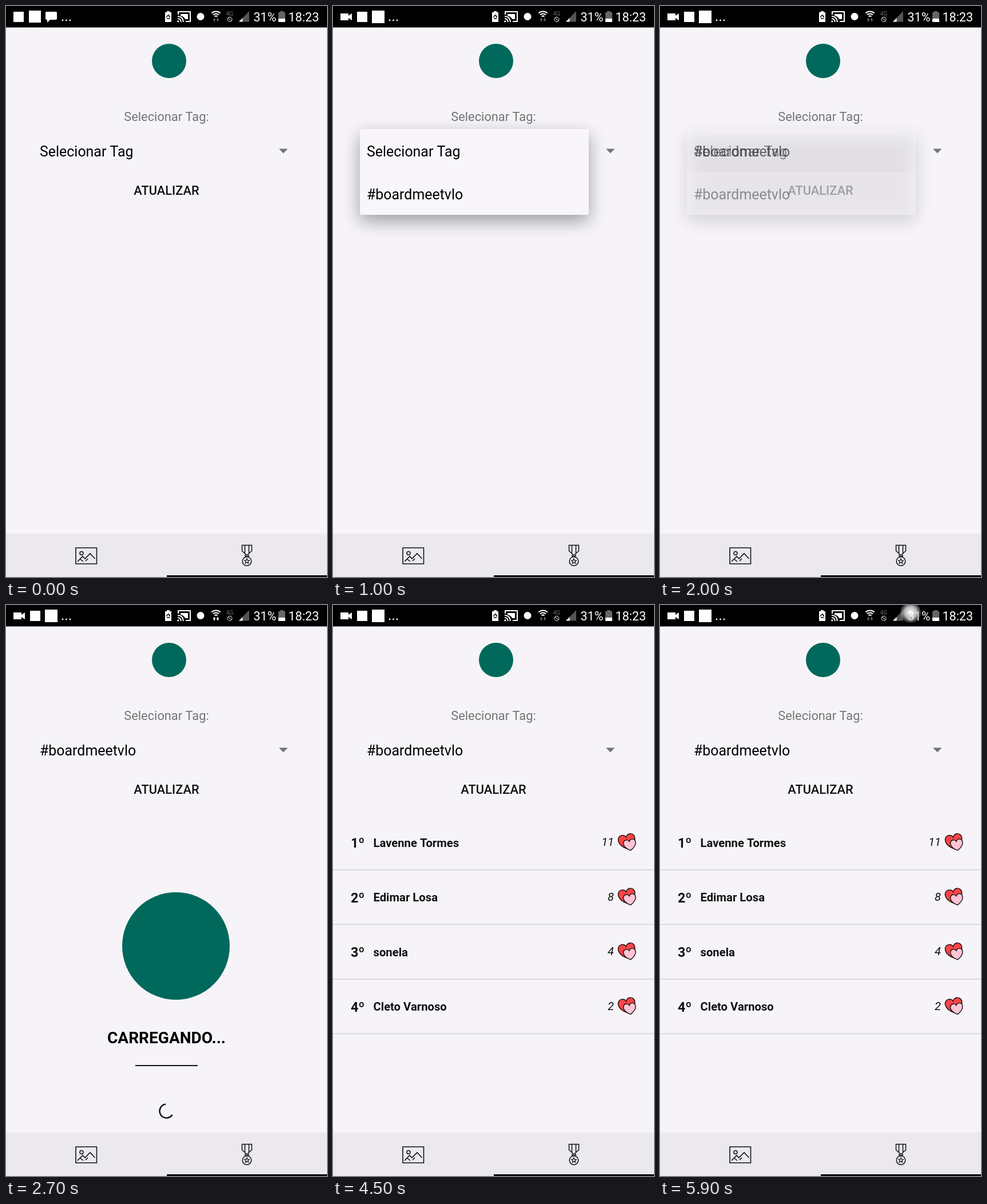
An HTML page with a canvas that plays this animation: 561x998 px, repeating every 6000 ms.

```html
<!DOCTYPE html>
<html lang="pt">
<head>
<meta charset="utf-8">
<style>
html, body { margin: 0; width: 561px; height: 998px; overflow: hidden; background: #f6f4f8; }
canvas { display: block; }
</style>
</head>
<body>
<canvas id="stage" width="561" height="998"></canvas>
<script>
const ctx = document.getElementById('stage').getContext('2d');
const LOOP = 6000, STEP = 100;
const BG = '#f6f4f8', INK = '#111', GREEN = '#00695c', GREY = '#757575';
const PROMPT = 'Selecionar Tag', TAG = '#boardmeetvlo';
const RANKING = [['Lavenne Tormes', 11], ['Edimar Losa', 8], ['sonela', 4], ['Cleto Varnoso', 2]];

function text(str, x, y, size, { color = INK, weight = 400, align = 'left', style = 'normal' } = {}) {
  ctx.font = `${style} ${weight} ${size}px Roboto, sans-serif`;
  ctx.textAlign = align;
  ctx.fillStyle = color;
  ctx.fillText(str, x, y);
}

function rect(x, y, w, h, color) {
  ctx.fillStyle = color;
  ctx.fillRect(x, y, w, h);
}

function disc(x, y, r, color) {
  ctx.beginPath();
  ctx.arc(x, y, r, 0, 2 * Math.PI);
  ctx.fillStyle = color;
  ctx.fill();
}

function fill(path, color) {
  ctx.fillStyle = color;
  ctx.fill(new Path2D(path));
}

function stroke(path, color, width) {
  ctx.strokeStyle = color;
  ctx.lineWidth = width;
  ctx.stroke(new Path2D(path));
}

function layer(alpha, draw) {
  ctx.save();
  ctx.globalAlpha = alpha;
  draw();
  ctx.restore();
}

function drawNotifications(recording) {
  if (recording) {
    fill('M13 13h14v4l6-4v12l-6-4v4h-14z', '#fff');
    rect(42, 10, 18, 18, '#fff');
    rect(68, 8, 22, 22, '#fff');
  } else {
    rect(13, 10, 18, 18, '#fff');
    rect(40, 8, 21, 21, '#fff');
    fill('M71 10h16q2 0 2 2v10q0 2-2 2h-10l-5 5v-5h-1q-2 0-2-2v-10q0-2 2-2z', '#fff');
  }
  for (const x of [99, 105.5, 112]) disc(x, 25, 1.4, '#fff');
}

function drawWifi(active) {
  ctx.strokeStyle = '#fff';
  ctx.lineWidth = 2;
  for (const r of [3.5, 7.5, 11.5]) {
    ctx.beginPath();
    ctx.arc(367, 21, r, -2.3, -0.84);
    ctx.stroke();
  }
  const color = active ? '#fff' : '#666';
  fill('M361.5 24l2.5-3 2.5 3h-1.5v3h-2v-3z', color);
  fill('M367.5 24l2.5 3 2.5-3h-1.5v-3h-2v3z', color);
}

function drawStatusBar(t) {
  rect(0, 0, 561, 37.5, '#000');
  drawNotifications(t >= 300);
  fill('M278 11h3v-2h5v2h3v17h-11z', '#fff');
  stroke('M283.5 15l3 5M286 22h-5M280.5 20l2-4', '#000', 1.6);
  stroke('M301 15v-5h21v17h-8', '#fff', 2);
  fill('M305 14h13v9h-5q-2-5-8-6z', '#fff');
  stroke('M300 18q9 0 10 10M300 22q5 0 6 6', '#fff', 2);
  disc(300.8, 26.8, 1.6, '#fff');
  disc(340, 18.5, 6.5, '#fff');
  drawWifi(t >= 2300 && t < 3500);
  text('4G', 391, 17, 10.5, { color: '#666', align: 'center' });
  ctx.beginPath();
  ctx.arc(391, 23.5, 4, 0, 7);
  ctx.strokeStyle = '#aaa';
  ctx.lineWidth = 1.3;
  ctx.stroke();
  stroke('M388 21l6 5', '#aaa', 1.3);
  fill('M425 9v18.5h-18z', '#555');
  fill('M413.5 21v6.5h-6.5z', '#fff');
  text('31%', 432.5, 26.7, 21.5, { color: '#fff' });
  fill('M476 11h3v-2h6v2h3v17h-12z', '#666');
  rect(476, 22, 12, 6, '#fff');
  text('18:23', 493.5, 26.7, 21.5, { color: '#fff' });
}

function drawNav() {
  rect(0, 922, 561, 76, '#ebe9ed');
  rect(281, 995, 280, 3, '#000');
  stroke('M122 947h36.5v28h-36.5zM125 971l9-9 4 4 9-9 8.5 9M130 967l5 4M139 970l4-4', INK, 1.6);
  stroke('M135 956.5a3 3 0 1 1-6 0a3 3 0 1 1 6 0z', INK, 1.5);
  stroke('M412.5 942.5h17v10l-8.5 7.5-8.5-7.5zM417.5 943v13M424.5 943v13M418 959v3h6v-3', INK, 1.5);
  ctx.beginPath();
  ctx.arc(421, 970.5, 7.8, 0, 7);
  ctx.stroke();
  ctx.beginPath();
  for (let i = 0; i < 10; i++) {
    const a = i * Math.PI / 5 - Math.PI / 2, r = i % 2 ? 2 : 4.6;
    ctx.lineTo(421 + r * Math.cos(a), 970.5 + r * Math.sin(a));
  }
  ctx.closePath();
  ctx.lineWidth = 1.2;
  ctx.stroke();
}

function drawHeader(t) {
  disc(285, 96, 30, GREEN);
  text('Selecionar Tag:', 280.5, 201, 21.8, { color: GREY, align: 'center' });
  if (t >= 600 && t < 1000) {
    const fade = t < 900 ? 1 : 0.4;
    layer(fade, () => {
      disc(481, 254, 34, '#f2f0f4');
      disc(480, 256, 22.5, '#e4e2e6');
    });
  }
  text(t < 2000 ? PROMPT : TAG, 59, 262.7, 24.93, { color: '#000' });
  fill('M477 249.5h15.5l-7.75 8z', GREY);
  text('ATUALIZAR', 280.5, 330, 21.8, { weight: 500, align: 'center' });
}

// The menu slides out of the field while its clip grows downwards.
function drawMenu(t) {
  if (t < 700 || t >= 2100) return;
  const open = t < 800 ? 0.55 : t < 900 ? 0.72 : 1;
  const alpha = t < 800 ? 0.65 : t < 900 ? 0.91 : t < 2000 ? 1 : 0.4;
  const x = 47 + 43 * (1 - open), dy = -75 * (1 - open), height = 150 * open;
  layer(alpha, () => {
    ctx.save();
    ctx.shadowColor = open < 1 ? 'rgba(0,0,0,.3)' : 'rgba(0,0,0,.36)';
    ctx.shadowBlur = open < 1 ? 12 : 30;
    ctx.shadowOffsetY = open < 1 ? 3 : 11;
    ctx.beginPath();
    ctx.roundRect(x, 215, 400, height, open < 1 ? 0 : 3);
    ctx.fillStyle = open < 1 ? '#f1f0f3' : '#f8f6fb';
    ctx.fill();
    ctx.restore();
    ctx.clip();
    if (t >= 1600) rect(x, 290, 400, 75, '#efedf1');
    text(PROMPT, x + 12, 262.7 + dy, 24.93, { color: '#000' });
    text(TAG, x + 12, 337.6 + dy, 24.93, { color: '#000' });
  });
}

function drawSpinner(t) {
  const ease = x => x * x * (3 - 2 * x);
  const elapsed = t - 1867, turn = 2 * Math.PI;
  const cycle = (elapsed / 1333) % 1;
  const head = 0.75 * ease(Math.min(1, cycle * 2));
  const tail = 0.75 * ease(Math.max(0, cycle * 2 - 1));
  const base = (cycle * 0.25 + elapsed / 2222 - 0.56) * turn;
  ctx.beginPath();
  ctx.arc(280.5, 884.5, 12, base + tail * turn, base + (head + 0.01) * turn);
  ctx.strokeStyle = INK;
  ctx.lineWidth = 2.5;
  ctx.stroke();
}

function drawLoading(t) {
  disc(297, 596, 94, GREEN);
  text('CARREGANDO...', 280.5, 766, 28.05, { color: '#000', weight: 700, align: 'center' });
  rect(226, 804, 109, 2, INK);
  drawSpinner(t);
}

function drawHeart(x, y, size, angle, color) {
  ctx.save();
  ctx.translate(x, y);
  ctx.rotate(angle);
  ctx.scale(size, size);
  const shape = 'M0 .92C-1.45 .1-1.1-.9-.5-.9C-.2-.9 0-.7 0-.5C0-.7 .2-.9 .5-.9C1.1-.9 1.45 .1 0 .92z';
  fill(shape, color);
  stroke(shape, INK, 1.4 / size);
  ctx.restore();
}

function drawRanking() {
  RANKING.forEach(([name, likes], i) => {
    const y = i * 95.5;
    text(`${i + 1}º`, 31, 424 + y, 23.4, { weight: 700 });
    text(name, 70.5, 422.8 + y, 20.25, { weight: 700 });
    text(likes, 491, 421 + y, 20, { style: 'italic', align: 'right' });
    drawHeart(514, 414 + y, 14.5, -0.2, '#ff4448');
    drawHeart(518.7, 419.3 + y, 10.5, -0.15, '#ffc4d4');
    rect(0, 462 + y, 561, 1.7, '#d7d6d9');
  });
}

function drawTouch(x, y, alpha) {
  layer(alpha, () => {
    disc(x, y, 18, 'rgba(242,240,248,.85)');
    ctx.strokeStyle = '#dedaec';
    ctx.lineWidth = 2;
    ctx.stroke();
  });
}

function drawTouches(t) {
  if (t >= 600 && t < 900) drawTouch(452, 274, t < 800 ? 0.8 : 0.3);
  if (t >= 1600 && t < 2000) drawTouch(379, 322.5, t < 1900 ? 1 : 0.4);
  if (t >= 5800) {
    const glow = ctx.createRadialGradient(438, 13, 2, 438, 13, 18);
    glow.addColorStop(0, 'rgba(255,255,255,.95)');
    glow.addColorStop(0.55, 'rgba(225,225,225,.8)');
    glow.addColorStop(1, 'rgba(120,120,120,.35)');
    ctx.save();
    ctx.beginPath();
    ctx.rect(0, 0, 561, 37);
    ctx.clip();
    disc(438, 13, 18, glow);
    ctx.restore();
  }
}

function render(now) {
  const t = Math.floor((now % LOOP) / STEP) * STEP;
  rect(0, 0, 561, 998, BG);
  drawStatusBar(t);
  drawHeader(t);
  if (t >= 3000) drawRanking();
  else if (t >= 2100) drawLoading(t);
  drawMenu(t);
  drawNav();
  drawTouches(t);
}

const start = performance.now();
function tick() {
  render(performance.now() - start);
  requestAnimationFrame(tick);
}
tick();
</script>
</body>
</html>
```
